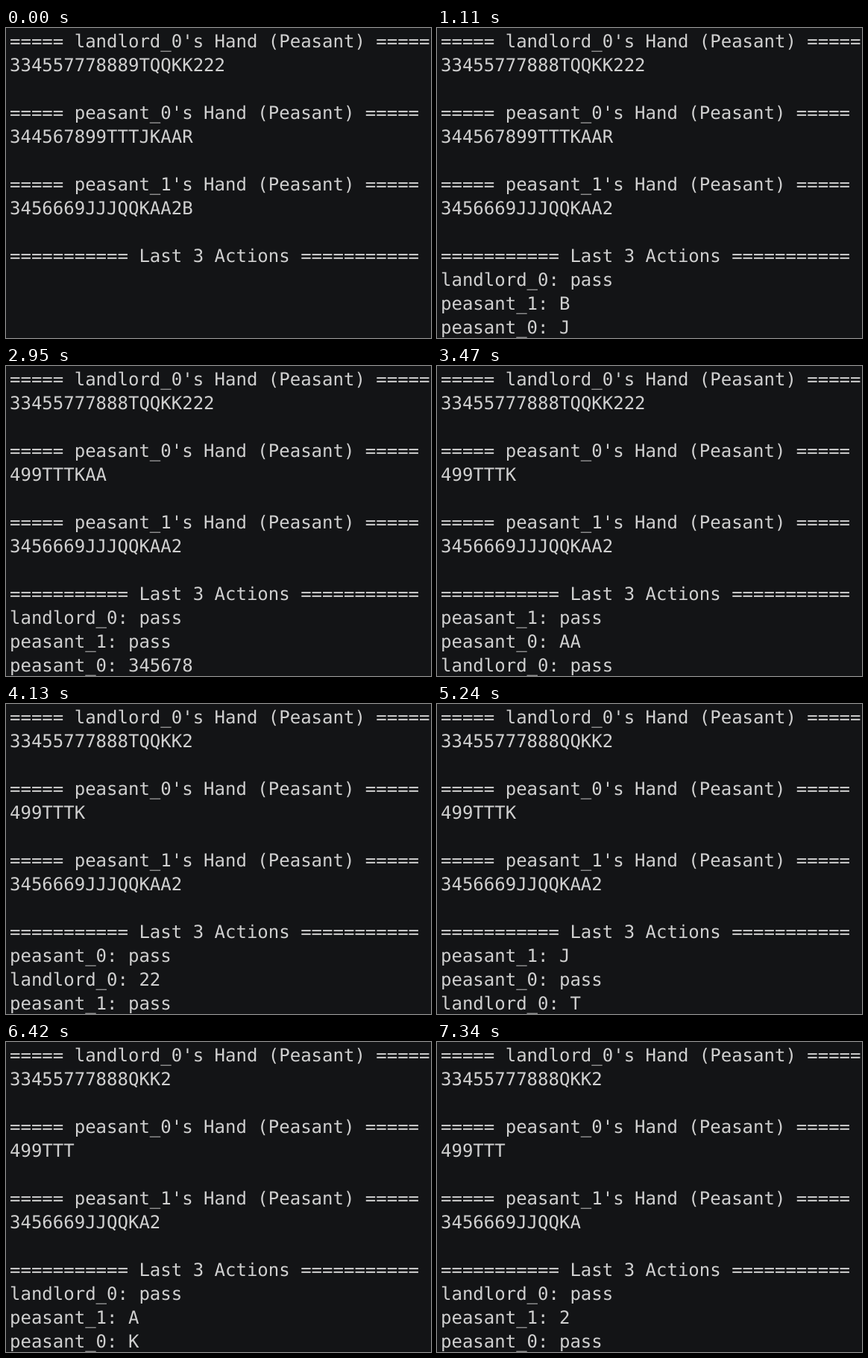
Recreate the animation shown at these times as an HTML page. Size 570 by 416 pixels, loop 8340 ms.

```html
<!DOCTYPE html>
<html lang="en">
<head>
<meta charset="utf-8">
<title>Card game log</title>
<style>
  html, body {
    margin: 0;
    width: 100%;
    height: 100%;
    overflow: hidden;
    background: #131416;
  }
  #screen {
    position: absolute;
    left: 5px;
    top: 2px;
    margin: 0;
    color: #d0d0d0;
    font: 24px/32px "DejaVu Sans Mono", monospace;
    white-space: pre;
    text-rendering: geometricPrecision;
  }
</style>
</head>
<body>
<pre id="screen"></pre>
<script>
const LOOP = 8340;
const SHORT = 260;
const LONG = 330;

const deal = {
  landlord_0: "334557778889TQQKK222",
  peasant_0: "344567899TTTJKAAR",
  peasant_1: "3456669JJJQQKAA2B"
};

// Turns rotate through this order; "-" is a pass.
const order = ["landlord_0", "peasant_0", "peasant_1"];
const plays = "9 J B - R - - 345678 - - AA - 22 - - T - J Q K A - - 2 -".split(" ");

// Number of turns played at the start of each long pause.
const longPauses = new Set([2, 4, 7, 8, 9, 12, 13, 16, 18, 19, 22, 24]);

const bar = n => "=".repeat(n);

function removeCards(hand, cards) {
  return [...cards].reduce((rest, card) => rest.replace(card, ""), hand);
}

function render(hands, log) {
  const blocks = order.map(name =>
    `${bar(5)} ${name}'s Hand (Peasant) ${bar(5)}\n${hands[name]}\n`);
  // Newest action comes first.
  const recent = log.slice(-3).reverse();
  return [...blocks, `${bar(11)} Last 3 Actions ${bar(11)}`, ...recent].join("\n");
}

function buildSteps() {
  const hands = { ...deal };
  const log = [];
  const steps = [{ at: 0, text: render(hands, log) }];
  let at = 0;
  plays.forEach((cards, turn) => {
    at += longPauses.has(turn) ? LONG : SHORT;
    const name = order[turn % order.length];
    const pass = cards === "-";
    if (!pass) hands[name] = removeCards(hands[name], cards);
    log.push(`${name}: ${pass ? "pass" : cards}`);
    steps.push({ at, text: render(hands, log) });
  });
  return steps;
}

const steps = buildSteps();
const screenEl = document.getElementById("screen");
const start = performance.now();
let shown = null;

function tick(now) {
  const t = Math.max(0, now - start) % LOOP;
  const step = steps.findLast(s => s.at <= t);
  if (step !== shown) {
    screenEl.textContent = step.text;
    shown = step;
  }
  requestAnimationFrame(tick);
}

tick(start);
</script>
</body>
</html>
```
